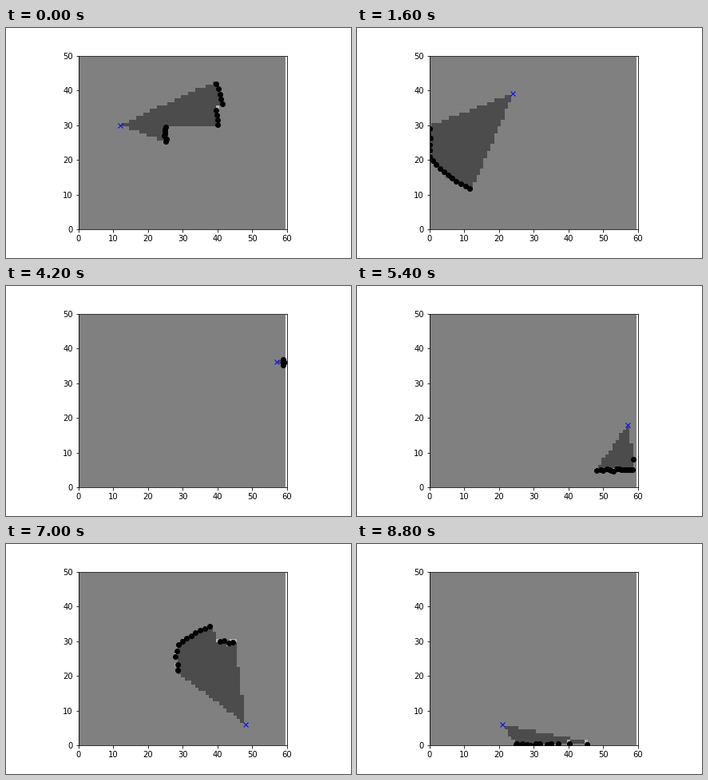
A matplotlib script that plays this animation: 432x288 px, repeating every 9000 ms.

```python
import math

import matplotlib.pyplot as plt
import numpy as np
from matplotlib.animation import FuncAnimation

ROWS, COLS = 50, 60
R_MAX = 30            # longest beam
CELL = 1.0            # obstacle thickness
BEAM = 0.05           # angle between beams
TURN = 0.3            # sensor rotation per step
FIRST, COUNT = 89, 45  # part of the drive that is shown
BEARINGS = np.arange(-0.4, 0.4, BEAM)
MOVES = [(3, 0), (0, 3), (-3, 0), (0, -3)]


def make_world():
    world = np.zeros((ROWS, COLS), bool)
    for r0, r1, c0, c1 in [(0, 10, 0, 10), (30, 35, 40, 45), (3, 6, 40, 60),
                           (20, 30, 25, 29), (40, 50, 5, 25)]:
        world[r0:r1, c0:c1] = True
    return world


def blocked(world, row, col):
    inside = 0 < row < ROWS - 1 and 0 < col < COLS - 1
    return not inside or world[row, col]


def drive(world, steps):
    """Go straight until blocked, then wait one step and turn clockwise."""
    row, col, theta, way = 30, 30, 0.0, 1
    poses = [(row, col, theta)]
    for _ in range(steps - 1):
        nxt = row + MOVES[way][0], col + MOVES[way][1]
        if blocked(world, *nxt):
            way = (way + 1) % 4
        else:
            row, col = nxt
        theta = (theta + TURN) % (2 * math.pi)
        poses.append((row, col, theta))
    return poses


def cast(world, row, col, angle):
    for r in range(1, R_MAX + 1):
        if blocked(world, round(row + r * math.cos(angle)),
                   round(col + r * math.sin(angle))):
            return r
    return R_MAX


def scan(world, row, col, theta):
    return np.array([cast(world, row, col, theta + b) for b in BEARINGS])


def likelihood(row, col, theta, ranges):
    """Occupancy per cell: 0.3 free, 0.5 unknown, 0.7 occupied."""
    i, j = np.mgrid[:ROWS, :COLS]
    dist = np.hypot(i - row, j - col)
    phi = (np.arctan2(j - col, i - row) - theta + math.pi) % (2 * math.pi) - math.pi
    off = np.abs(phi[..., None] - BEARINGS)
    reach = ranges[off.argmin(axis=2)]
    unknown = ((dist > np.minimum(R_MAX, reach + CELL / 2))
               | (off.min(axis=2) > BEAM / 2))
    hit = (reach < R_MAX) & (np.abs(dist - reach) < CELL / 2)
    return np.select([unknown, hit, dist < reach], [0.5, 0.7, 0.3], 0.0)


plt.rcParams.update({"font.family": "DejaVu Sans", "font.size": 10})
fig = plt.figure(figsize=(6, 4), dpi=72, facecolor="white")
fig.subplots_adjust(left=0.125, right=0.9, bottom=0.125, top=0.88)
ax = fig.add_subplot()
image = ax.imshow(np.full((ROWS, COLS), 0.5), cmap="gray", vmin=0, vmax=1,
                  origin="lower", interpolation="nearest")
hits, = ax.plot([], [], "ko")
robot, = ax.plot([], [], "bx")
ax.set_xlim(0, COLS)
ax.set_ylim(0, ROWS)

world = make_world()
poses = drive(world, FIRST + COUNT)


def update(n):
    row, col, theta = poses[FIRST + n]
    ranges = scan(world, row, col, theta)
    image.set_data(likelihood(row, col, theta, ranges))
    hits.set_data(col + ranges * np.sin(theta + BEARINGS),
                  row + ranges * np.cos(theta + BEARINGS))
    robot.set_data([col], [row])
    return image, hits, robot


anim = FuncAnimation(fig, update, frames=COUNT, interval=200,
                     repeat=True, repeat_delay=0)
plt.show()
```
